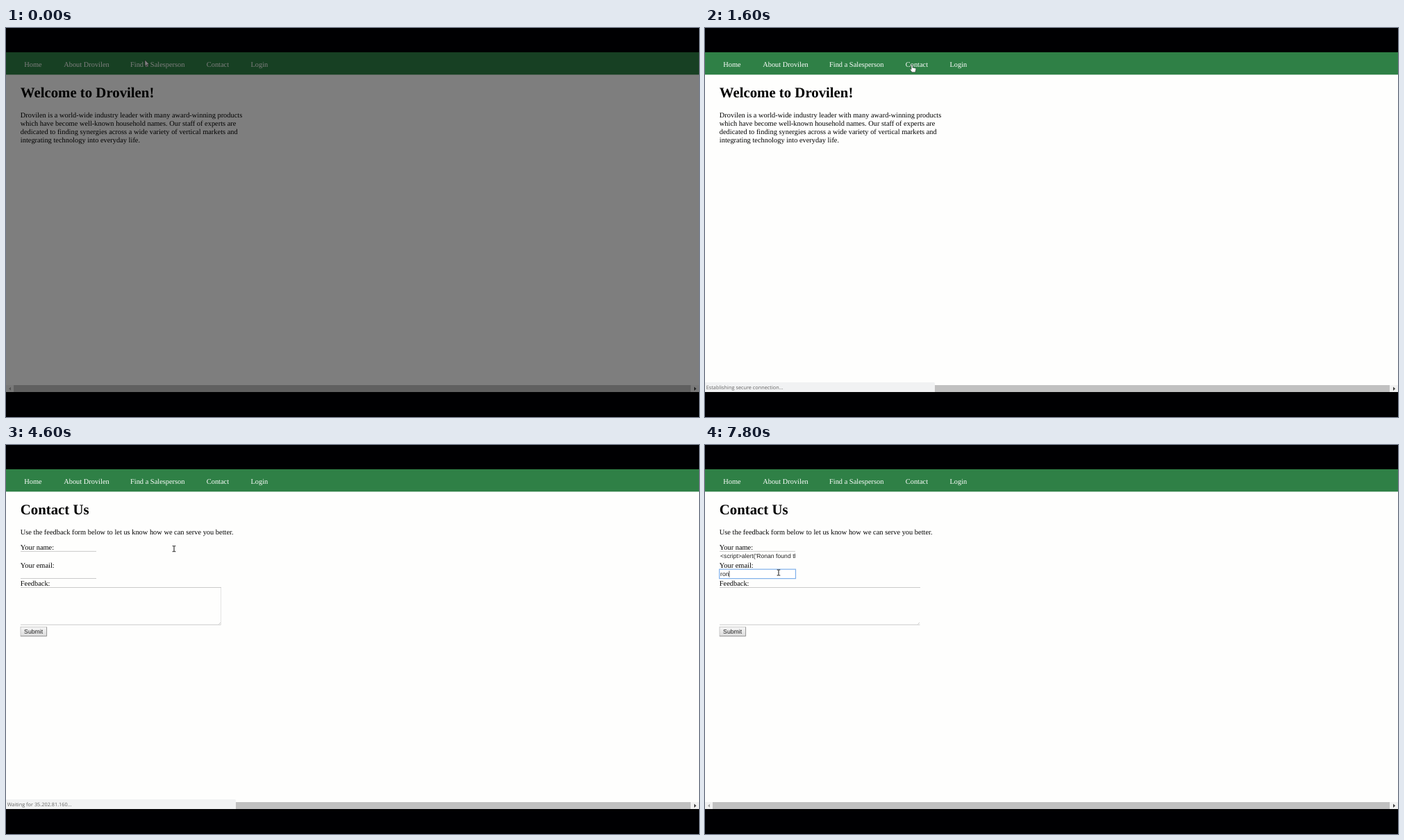
Animation, 998 px wide and 561 px high, one loop 8000 ms. Source, as an HTML page:

```html
<!DOCTYPE html>
<html lang="en">
<head>
<meta charset="utf-8">
<title>Contact form</title>
<style>
  html, body { margin: 0; width: 100%; height: 100%; overflow: hidden; background: #000002; }
  svg { display: block; }
  text { font: 10.4px "Liberation Serif", "Times New Roman", serif; fill: #000; text-rendering: geometricPrecision; }
  .nav text { fill: #fff; }
  .h1 { font-size: 20.8px; font-weight: bold; }
  .ui { font: 8.66px "Liberation Sans", Arial, sans-serif; fill: #222; }
  #status text { font: 7.33px "Open Sans", "Noto Sans", sans-serif; fill: #666; }
  .line { stroke: #c4c4c4; stroke-width: .9; fill: none; }
  .focus { fill: #fff; stroke: #7fb0ea; stroke-width: 1.2; }
  .caret { stroke: #222; stroke-width: .8; }
</style>
</head>
<body>
<svg width="998" height="561" viewBox="0 0 998 561">
  <rect width="998" height="561" fill="#000002"/>
  <rect y="35" width="998" height="490" fill="#fefefd"/>
  <rect y="35" width="998" height="32.3" fill="#2f8046"/>
  <g class="nav">
    <text x="26.3" y="55.8">Home</text>
    <text x="83.2" y="55.8">About Drovilen</text>
    <text x="179" y="55.8">Find a Salesperson</text>
    <text x="288.8" y="55.8">Contact</text>
    <text x="352.4" y="55.8">Login</text>
  </g>

  <g id="home">
    <text class="h1" x="20.8" y="100">Welcome to Drovilen!</text>
    <text x="20.8" y="128.5">Drovilen is a world-wide industry leader with many award-winning products</text>
    <text x="20.8" y="140.5">which have become well-known household names. Our staff of experts are</text>
    <text x="20.8" y="152.6">dedicated to finding synergies across a wide variety of vertical markets and</text>
    <text x="20.8" y="164.7">integrating technology into everyday life.</text>
  </g>

  <g id="contact">
    <text class="h1" x="20.8" y="100">Contact Us</text>
    <text x="20.8" y="128.5">Use the feedback form below to let us know how we can serve you better.</text>
    <text x="20.8" y="150.8">Your name:</text>
    <text x="20.8" y="176.8">Your email:</text>
    <text x="20.8" y="202.7">Feedback:</text>
    <path class="line" d="M21 153.4H130M21 192.5H130M21 205.5H310M21 259.2H309.5M306.5 258.5l2.5-2.5"/>
    <path id="edge" class="line" d="M309.5 205.5V259" opacity=".5"/>
    <rect x="21" y="262.3" width="37.6" height="13.4" fill="url(#btn)" stroke="#b8b8b8" stroke-width=".7"/>
    <path d="M21 275.7H58.6V262.5" fill="none" stroke="#8c8c8c" stroke-width=".8"/>
    <text class="ui" x="39.6" y="271.7" text-anchor="middle">Submit</text>
    <rect id="nameFocus" class="focus" x="20.7" y="153.3" width="109.8" height="13.6"/>
    <rect id="mailFocus" class="focus" x="20.7" y="179.2" width="109.8" height="13.4"/>
    <svg x="22" y="154" width="108" height="12">
      <text id="name" class="ui" y="9.1">&lt;script&gt;alert('Ronan found the XSS!')&lt;/script&gt;</text>
    </svg>
    <text id="mail" class="ui" x="22" y="189"></text>
    <path id="caret" class="caret" d="M0-4.5V4.5"/>
  </g>

  <g id="bar">
    <rect y="515" width="998" height="10" fill="#f1f1f1"/>
    <rect x="11" y="515" width="975" height="10" fill="#c1c1c1"/>
    <path d="M7 517.7V522.7L4 520.2Z" fill="#a3a3a3"/>
    <path d="M991 517.5V522.9L994.2 520.2Z" fill="#404040"/>
  </g>
  <g id="status">
    <path d="M0 511H329.5Q331 511 331 512.5V525H0Z" fill="#f1f2f3"/>
    <text id="note" x="1.7" y="521.4"></text>
  </g>

  <g id="pointer">
    <path id="arrow" d="M0 0V9L2.1 7.1L3.5 10.2L4.9 9.6L3.5 6.5H6.3Z" fill="#fff" stroke="#222" stroke-width=".5"/>
    <g id="hand" fill="#fff" stroke="#222" stroke-width=".5">
      <path d="M-.9 6V.6Q0-.6 .9 .6V4L5.2 5Q6 5.3 5.8 6.5L4.8 10.8H.1L-2.8 6.7Q-2.5 5.2-.9 6.8Z"/>
    </g>
    <path id="beam" d="M-2.3-4H-.6L0-3.5L.6-4H2.3M0-3.5V3.5M-2.3 4H-.6L0 3.5L.6 4H2.3" fill="none" stroke="#111" stroke-width="1"/>
  </g>
  <rect id="dim" y="35" width="998" height="490" fill="#000" opacity=".5"/>
  <defs>
    <linearGradient id="btn" x2="0" y2="1">
      <stop stop-color="#f7f7f7"/><stop offset="1" stop-color="#dcdcdc"/>
    </linearGradient>
  </defs>
</svg>
<script>
const LOOP = 8000, STEP = 200;
const $ = id => document.getElementById(id);
const show = (id, on) => $(id).style.display = on ? "" : "none";
const last = (list, t) => list.filter(k => k[0] <= t).pop()[1];

// Pointer stops: time, x, y
const path = [
  [0, 200, 46], [200, 200, 46], [1000, 291, 57.5], [1200, 298, 53], [1600, 298, 53],
  [2400, 242, 149.7], [4600, 242, 149.7], [5400, 110.3, 156.3], [6400, 110.3, 156.3],
  [6800, 106, 184], [LOOP, 106, 184]
];
const shapes = [[0, "arrow"], [800, "hand"], [1800, "arrow"], [2000, "beam"], [4800, "arrow"], [5400, "beam"]];
const notes = [
  [0, ""], [1200, "35.202.81.160/contact.php"], [1600, "Establishing secure connection..."],
  [3200, "Waiting for 35.202.81.160..."], [4800, ""]
];
const typed = [[0, ""], [7600, "r"], [7800, "ron"]];

function pointerAt(t) {
  const i = path.findIndex(k => k[0] > t);
  const [t0, x0, y0] = path[i - 1], [t1, x1, y1] = path[i];
  const u = (t - t0) / (t1 - t0), e = u * u * (3 - 2 * u);
  return [x0 + (x1 - x0) * e, y0 + (y1 - y0) * e];
}

function draw(t) {
  const onName = t >= 5600 && t < 7000, onMail = t >= 7000, pasted = t >= 6200;
  show("dim", t < 200);
  show("home", t < 4600);
  show("contact", t >= 4600);
  show("edge", t < 4800);

  const note = last(notes, t);
  show("status", note);
  $("note").textContent = note;

  show("nameFocus", onName);
  show("mailFocus", onMail);
  show("name", pasted);
  // A focused field scrolls to the end of its text
  $("name").setAttribute("x", onName ? 107 : 0);
  $("name").setAttribute("text-anchor", onName ? "end" : "start");

  const mail = $("mail");
  mail.textContent = last(typed, t);
  const caretX = onMail ? 22.4 + mail.getComputedTextLength() : pasted ? 129.3 : 22.4;
  show("caret", onName || onMail);
  $("caret").setAttribute("transform", `translate(${caretX} ${onMail ? 186 : 160})`);

  const shape = last(shapes, t);
  for (const id of ["arrow", "hand", "beam"]) show(id, id === shape);
  $("pointer").setAttribute("transform", `translate(${pointerAt(t)})`);
}

function frame(now) {
  draw(Math.floor(now % LOOP / STEP) * STEP);
  requestAnimationFrame(frame);
}
draw(0);
requestAnimationFrame(frame);
</script>
</body>
</html>
```
